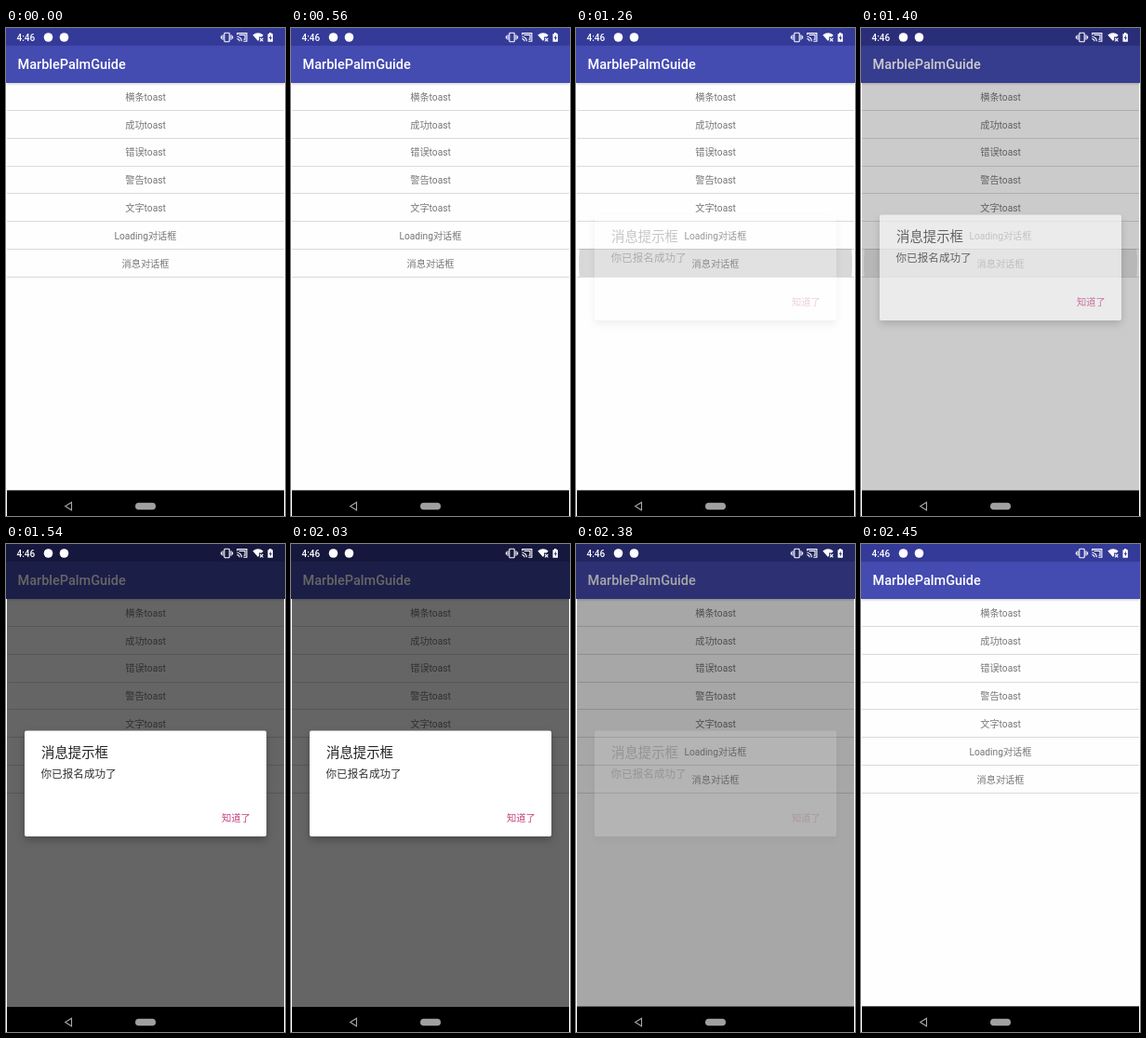
Write an HTML page that moves like this. It is 300 by 524 pixels and loops after 2.59 s.

```html
<!DOCTYPE html>
<html lang="zh-CN">
<head>
<meta charset="utf-8">
<title>Message dialog</title>
<style>
  html, body { margin: 0; height: 100%; overflow: hidden; background: #fff; }
  svg { display: block; width: 100vw; height: 100vh; }
  text { font-family: Roboto, "Noto Sans CJK SC", "Noto Sans CJK", sans-serif; }
  .card { filter: drop-shadow(0 4px 4px rgba(0, 0, 0, .25)); }
  .icon { fill: none; stroke: #fff; stroke-width: 1.1; }
</style>
</head>
<body>
<svg viewBox="0 0 300 524">
  <defs>
    <clipPath id="row"><rect x="1" y="237" width="298" height="30"/></clipPath>
    <linearGradient id="fall" x2="0" y2="1">
      <stop stop-color="#000" stop-opacity=".15"/>
      <stop offset="1" stop-color="#000" stop-opacity="0"/>
    </linearGradient>
  </defs>

  <rect width="300" height="524" fill="#fefefe"/>
  <g id="list" font-size="10.2" fill="#757575" text-anchor="middle"></g>
  <circle id="ripple" cx="150" cy="252.5" clip-path="url(#row)"/>
  <rect x="1" y="59" width="298" height="3" fill="url(#fall)"/>
  <rect width="300" height="19" fill="#343a97"/>
  <rect y="19" width="300" height="40" fill="#444bb1"/>
  <text x="12.5" y="44" font-size="14.5" font-weight="500" fill="#fff">MarblePalmGuide</text>

  <path id="dim" d="M0 0h300v59h-1v437H1V59H0z"/>

  <g id="dialog">
    <rect class="card" x="20" y="200.5" width="260" height="113.5" rx="2" fill="#fff"/>
    <text x="38" y="229" font-size="14.4" fill="#222">消息提示框</text>
    <text x="37.5" y="251.2" font-size="11.6" fill="#333">你已报名成功了</text>
    <text x="232" y="298" font-size="10.3" font-weight="500" fill="#c43d7c">知道了</text>
  </g>

  <!-- status bar -->
  <g fill="#fff">
    <text x="11.5" y="13.6" font-size="10" font-weight="500">4:46</text>
    <circle cx="45.5" cy="10" r="4.8"/>
    <circle cx="62.5" cy="10" r="4.8"/>
    <g class="icon">
      <rect x="234.8" y="5.3" width="5.4" height="9.4" rx=".8"/>
      <path d="M233 7.2v5.6M231.4 8.5v3M242 7.2v5.6M243.6 8.5v3"/>
      <path d="M248.7 7.5V5.6h10.2v8.6h-3.6M248.4 9.2a5 5 0 0 1 5 5M248.4 11.6a2.7 2.7 0 0 1 2.7 2.7M250.5 7.5h6.5v4.8h-1.5"/>
    </g>
    <path d="M265.3 7.5q5.7-4.6 11.4 0l-1.6 2h-3v3l-1.1 1.5z"/>
    <path class="icon" d="M273 11l3.4 3.4M276.4 11l-3.4 3.4"/>
    <path d="M281.5 6.2h1.5V5h2.4v1.2h1.5v8.6h-5.4z"/>
    <path d="M284.8 7.5l-2 3.5h1.2v2.5l2-3.5h-1.2z" fill="#343a97"/>
  </g>

  <!-- navigation bar -->
  <rect x="1" y="496.4" width="298" height="28"/>
  <path d="M70.5 509.3v8.4l-6.8-4.2z" fill="none" stroke="#aaa" stroke-width="1.1"/>
  <rect x="139" y="509.7" width="22" height="7.6" rx="3.8" fill="#a0a0a0"/>
</svg>
<script>
  const LOOP = 2590, STEP = 70;
  const OPEN = 1260, CLOSE = 2170;
  const $ = id => document.getElementById(id);
  const ramp = (t, from, to) => Math.min(1, Math.max(0, (t - from) / (to - from)));

  const labels = ["横条toast", "成功toast", "错误toast", "警告toast",
                  "文字toast", "Loading对话框", "消息对话框"];
  $("list").innerHTML = labels.map((label, i) => {
    const y = i * 29.83;
    return `<text x="150" y="${77.7 + y}">${label}</text>
      <rect x="1" y="${Math.round(88 + y)}" width="298" height="1" fill="#dadada"/>`;
  }).join("");

  function draw(now) {
    const t = Math.floor(now % LOOP / STEP) * STEP;
    const press = ramp(t, 980, OPEN);
    const release = ramp(t, 1330, 1540);
    const leave = ramp(t, CLOSE, 2450);

    // the dialog first shows as a faint ghost, then fades in fully
    const enter = t < OPEN ? 0 : .25 + .75 * ramp(t, 1330, 1470);
    $("dialog").setAttribute("opacity", enter * (1 + Math.cos(Math.PI * leave)) / 2);
    $("dim").setAttribute("opacity", .6 * release * (1 - leave ** 3));
    $("ripple").setAttribute("r", 147 * press);
    $("ripple").setAttribute("opacity", .15 * press * (1 - release));
  }

  const start = performance.now();
  function tick() {
    draw(performance.now() - start);
    requestAnimationFrame(tick);
  }
  tick();
</script>
</body>
</html>
```
